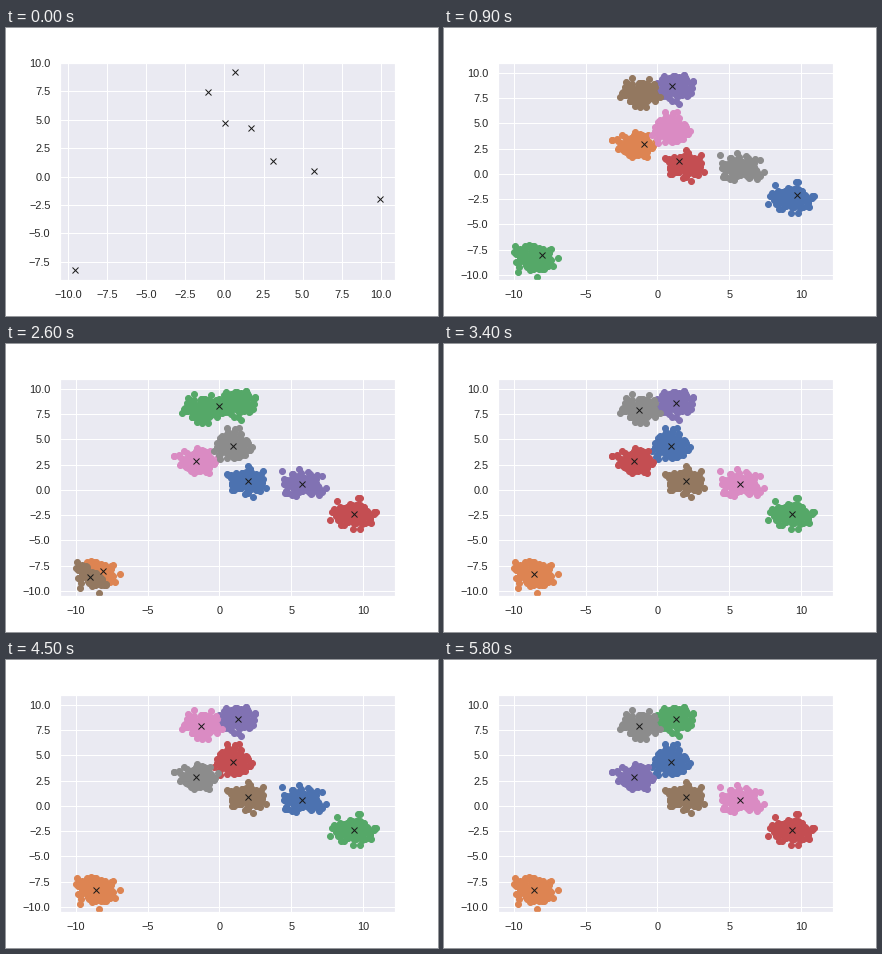
Animation of 432 by 288 pixels, one loop 5900 ms. Source, as a matplotlib script:

```python
import numpy as np
import matplotlib.pyplot as plt
from matplotlib.animation import FuncAnimation
from matplotlib.ticker import MultipleLocator

FRAMES, STEP_MS = 59, 100
K, N, SPREAD = 8, 150, 0.57
DEEP = ["#4C72B0", "#DD8452", "#55A868", "#C44E52",
        "#8172B3", "#937860", "#DA8BC3", "#8C8C8C"]

plt.rcParams.update({
    "font.family": "Liberation Sans",
    "xtick.labelsize": 11, "ytick.labelsize": 11,
    "xtick.color": ".15", "ytick.color": ".15",
    "axes.facecolor": "#EAEAF2", "axes.edgecolor": "white",
    "axes.linewidth": 1.25, "axes.grid": True, "axes.axisbelow": True,
    "grid.color": "white", "grid.linewidth": 1,
    "xtick.bottom": False, "ytick.left": False,
    "xtick.major.size": 6, "ytick.major.size": 6,
})

rng = np.random.default_rng(5)

MEANS = np.array([(-1.29, 7.92), (1.29, 8.6), (0.94, 4.36), (-1.64, 2.87),
                  (1.98, 0.89), (5.74, 0.6), (9.36, -2.38), (-8.6, -8.32)])
FIRST = np.array([(9.94, -1.98), (0.03, 4.7), (-9.55, -8.23), (3.1, 1.36),
                  (0.67, 9.19), (-1.05, 7.43), (1.69, 4.26), (5.72, 0.48)])


def make_blob(mean):
    z = rng.normal(0, SPREAD, (N, 2))
    return mean + z - z.mean(0)


points = np.vstack([make_blob(m) for m in MEANS])


def assign(centers):
    return ((points[:, None] - centers) ** 2).sum(2).argmin(1)


def update(labels):
    return np.array([points[labels == k].mean(0) for k in range(K)])


def seed(order, moved=None):
    """Seeds near the blobs in the given order; moved ones sit elsewhere."""
    centers = MEANS[[int(b) for b in order]] + rng.normal(0, 0.3, (K, 2))
    for k, xy in (moved or {}).items():
        centers[k] = xy
    return centers


# start, seeds, whether the seeds appear one by one
RUNS = [
    (0, FIRST, False),
    (5, seed("37641025"), True),
    (18, seed("47065732", {1: (-8.3, -8.0), 5: (-8.9, -8.65)}), False),
    (33, seed("27631450"), False),
    (40, seed("57621403"), False),
    (46, seed("70562341"), False),
    (49, seed("43571620", {0: (2.2, -0.2), 1: (-0.6, 3.6),
                           4: (1.1, 6.9), 6: (1.3, 2.4)}), False),
    (54, seed("27163450"), False),
]


def build_states():
    """Centers and labels of every k-means step, run after run."""
    states, labels = [], None
    ends = [start for start, *_ in RUNS[1:]] + [FRAMES]
    for (_, seeds, gradual), end in zip(RUNS, ends):
        if gradual:
            for n in range(1, K):
                labels = assign(update(labels))
                states.append((seeds[:n], labels))
        labels = assign(seeds)
        states.append((seeds, labels))
        while len(states) < end:
            centers = update(labels)
            states.append((centers, labels))
            labels = assign(centers)
    return states


STATES = build_states()

fig = plt.figure(figsize=(6, 4), dpi=72)
ax = fig.add_axes([0.125, 0.125, 0.775, 0.755])
groups = [ax.scatter([], [], color=c) for c in DEEP]
marks, = ax.plot([], [], "x", color=".1")


def set_view(xlim, ylim, xstep):
    ax.set_xlim(xlim)
    ax.set_ylim(ylim)
    ax.xaxis.set_major_locator(MultipleLocator(xstep))
    ax.yaxis.set_major_locator(MultipleLocator(2.5))


def draw(i):
    centers, labels = STATES[i]
    if i == 0:
        set_view((-10.52, 10.9), (-9.1, 10.04), 2.5)
    else:
        set_view((-11.1, 12.2), (-10.5, 11.0), 5)
    for k, group in enumerate(groups):
        group.set_offsets(points[labels == k] if i else np.empty((0, 2)))
    marks.set_data(*centers.T)
    return [*groups, marks]


anim = FuncAnimation(fig, draw, frames=FRAMES, interval=STEP_MS,
                     init_func=lambda: draw(0), repeat=True, repeat_delay=0)
plt.show()
```
